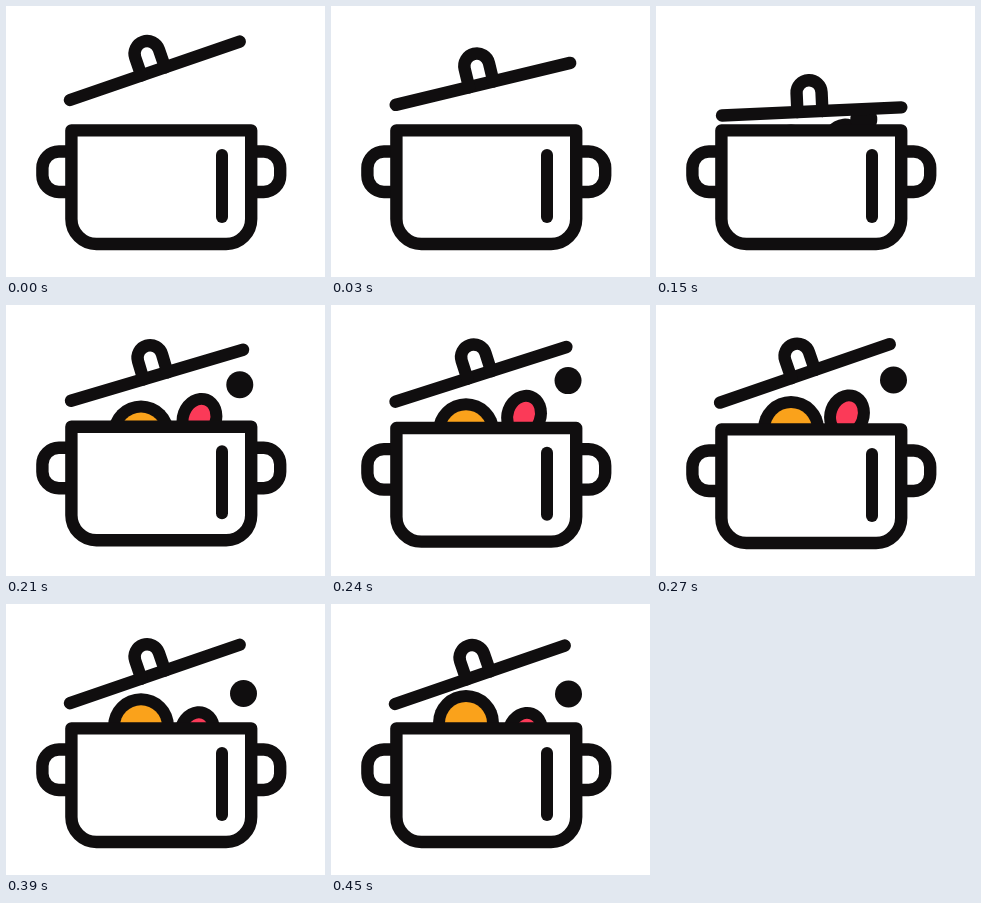
Recreate the animation shown at these times as an HTML page with a canvas. Size 319 px wide and 271 px high, loop 0.6 s.

```html
<!DOCTYPE html>
<html lang="en">
<head>
<meta charset="utf-8">
<title>Cooking pot</title>
<style>
  html, body { margin: 0; width: 100%; height: 100%; overflow: hidden; background: #fff; }
  canvas { display: block; width: 319px; height: 271px; }
</style>
</head>
<body>
<canvas id="stage" width="319" height="271"></canvas>
<script>
const ctx = document.getElementById('stage').getContext('2d');
const INK = '#100e0f', ORANGE = '#faa21b', RED = '#fb3a58';
const LOOP = 600, STEP = 30, LAST_STEP = 450;
const POP = 150, JOLT_PERIOD = 120, JOLTS = 2;

const rad = deg => deg * Math.PI / 180;
const ramp = (t, from, to) => Math.min(1, Math.max(0, (t - from) / (to - from)));
const easeOut = k => 1 - (1 - k) ** 3;

// After the lid pops open the pot hops a fixed number of times.
function joltAt(t) {
  const hops = (t - POP) / JOLT_PERIOD;
  return hops > 0 && hops < JOLTS ? Math.sin(Math.PI * hops) ** 2 : 0;
}

function line(x1, y1, x2, y2) {
  ctx.beginPath();
  ctx.moveTo(x1, y1);
  ctx.lineTo(x2, y2);
  ctx.stroke();
}

function oval(x, y, rx, ry, tilt, fill) {
  ctx.beginPath();
  ctx.ellipse(x, y, rx, ry, rad(tilt), 0, Math.PI * 2);
  ctx.fillStyle = fill;
  ctx.fill();
}

function food(x, y, rx, ry, tilt, fill) {
  oval(x, y, rx, ry, tilt, INK);
  oval(x, y, rx - 12, ry - 12, tilt, fill);
}

function handle(rimX, outerX) {
  ctx.beginPath();
  ctx.moveTo(rimX, 145.5);
  ctx.arcTo(outerX, 145.5, outerX, 166, 16.5);
  ctx.arcTo(outerX, 186, rimX, 186, 16.5);
  ctx.lineTo(rimX, 186);
  ctx.stroke();
}

function pot(jolt) {
  const left = 65.4, right = 245.2, top = 124.4, bottom = 238;
  ctx.save();
  ctx.translate(0, -2.7 * jolt);
  handle(left, 36.4);
  handle(right, 274.2);
  ctx.beginPath();
  ctx.moveTo(left, top);
  ctx.lineTo(right, top);
  ctx.arcTo(right, bottom, left, bottom, 25);
  ctx.arcTo(left, bottom, left, top, 25);
  ctx.closePath();
  ctx.fillStyle = '#fff';
  ctx.fill();
  ctx.stroke();
  ctx.lineWidth = 12;
  line(216, 149, 216, 211);
  ctx.restore();
}

function lid(t, jolt) {
  const open = 1 - ramp(t, 0, 90) + ramp(t, POP, 210);
  ctx.save();
  ctx.translate(66 - 2 * open + jolt, 107.5 - 13.5 * open + t / 75 - jolt);
  ctx.rotate(rad(-2.6 - 16.4 * open + 2.5 * jolt));
  line(0, 0, 179.5, 0);
  ctx.beginPath();
  ctx.moveTo(75.5, 0);
  ctx.arc(88, -18.8, 12.5, Math.PI, 0);
  ctx.lineTo(100.5, 0);
  ctx.stroke();
  ctx.restore();
}

function ingredients(t, jolt) {
  const below = 1 - easeOut(ramp(t, 120, 270));
  const settle = easeOut(ramp(t, 270, 450));
  const sway = Math.cos(2 * Math.PI * (t - 210) / 240);

  const orangeBelow = 1 - easeOut(ramp(t, 120, 220));
  const orangeLift = ramp(t, 360, 450);
  food(135, 124 + 80 * orangeBelow + 4.5 * jolt - 5 * orangeLift, 33, 33, 0, ORANGE);
  food(191 + 3 * sway - 8 * below, 110 + 55 * below + 18.5 * settle, 22.5, 26, 20, RED);
  oval(237.5 - 58 * below, 75 + 75 * below + 15 * settle, 13.5, 13.5, 0, INK);
}

function draw(now) {
  const t = Math.min(Math.floor(now % LOOP / STEP) * STEP, LAST_STEP);
  const jolt = joltAt(t);
  ctx.fillStyle = '#fff';
  ctx.fillRect(0, 0, 319, 271);
  ctx.strokeStyle = INK;
  ctx.lineWidth = 12.4;
  ctx.lineCap = ctx.lineJoin = 'round';
  ingredients(t, jolt);
  pot(jolt);
  lid(t, jolt);
}

const start = performance.now();
function tick() {
  draw(performance.now() - start);
  requestAnimationFrame(tick);
}
tick();
</script>
</body>
</html>
```
